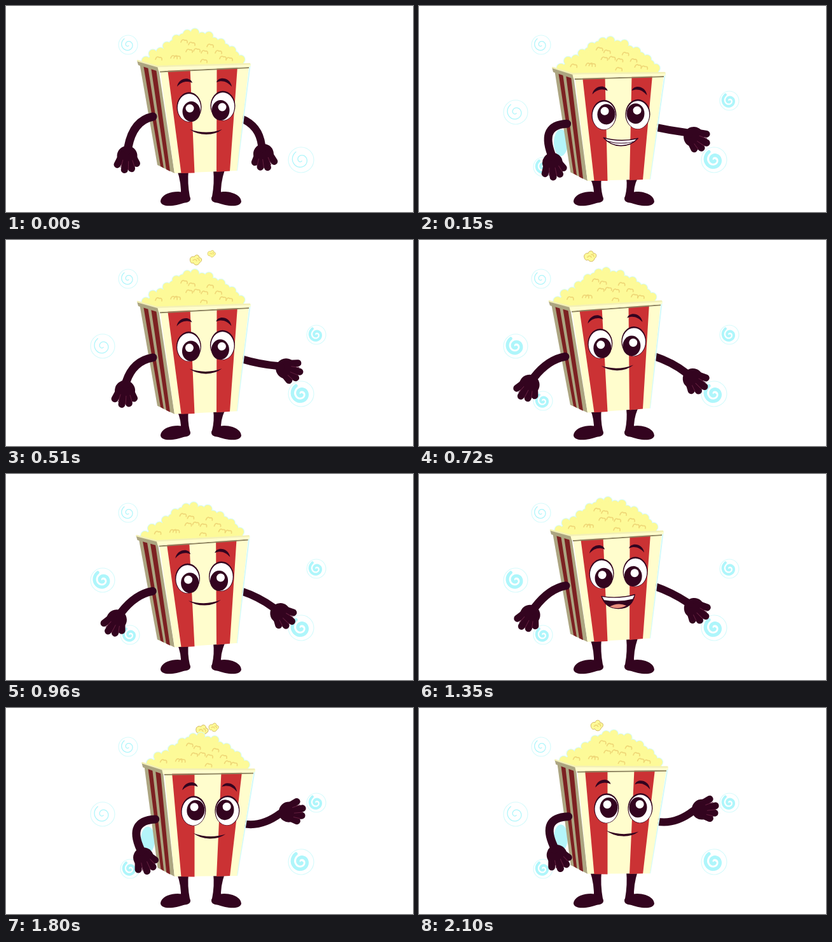
An HTML page for the animation above (2.13 s loop, 640 px wide and 324 px high).

```html
<!DOCTYPE html>
<html lang="en">
<head>
<meta charset="utf-8">
<title>Dancing popcorn</title>
<style>
html, body { margin: 0; width: 100%; height: 100%; overflow: hidden; background: #fff; }
svg { display: block; width: 640px; height: 324px; }
.ink { fill: #33041f; }
.line { fill: none; stroke: #33041f; stroke-linecap: round; stroke-linejoin: round; }
.cream { fill: #fffdcd; }
.red { fill: #cb3234; }
.shade { fill: #aca581; }
.wine { fill: #7c2122; }
.halo { fill: none; stroke: #d3fafa; stroke-width: 2; stroke-linejoin: round; }
.corn { fill: #fdfa98; }
.crumb { fill: none; stroke: #efd777; stroke-width: 1.7; stroke-linecap: round; }
.swirl { fill: none; stroke: #aef6fb; stroke-linecap: round; }
.ring { fill: none; stroke: #d6fbfc; stroke-width: 1.2; }
.seam { fill: none; stroke: #64203f; stroke-width: 1; stroke-linecap: round; }
</style>
</head>
<body>
<svg viewBox="0 0 640 324">
  <defs>
    <path id="foot" class="ink" d="M243 308C243 298 257 292 270 292C278 292 290 296 290 303C290 308 285 309 279 310C268 314 246 318 243 308Z"/>
    <g id="hand">
      <ellipse class="ink" cx="14" cy="0" rx="16" ry="16"/>
      <path class="line" stroke-width="11" d="M12 8L24 16M16 5L33 9M16 -1L36 -2M13 -8L29 -14"/>
      <path class="seam" d="M20 9L29 13M22 3L35 4M21 -6L33 -8"/>
    </g>
    <g id="kernel">
      <path class="corn" stroke="#c9a94e" stroke-width=".8" d="M-9 2C-11 -4 -5 -6 -3 -5C-2 -10 5 -10 5 -5C11 -6 11 1 7 3C6 9 -1 9 -3 5C-6 7 -8 5 -9 2Z"/>
      <path class="crumb" d="M-4 1Q-1 -3 2 1M2 -3Q5 -4 6 0"/>
    </g>
  </defs>
  <g id="swirls"></g>
  <ellipse id="glow" cx="223" cy="205" rx="11" ry="21" fill="#b4f5fa"/>
  <g id="kernels"></g>
  <path id="legL" class="ink"/>
  <path id="legR" class="ink" transform="matrix(-1 0 0 1 613 0)"/>
  <use href="#foot"/>
  <use href="#foot" transform="matrix(-1 0 0 1 613 0)"/>
  <path id="armR" class="line" stroke-width="12"/>
  <use id="handR" href="#hand"/>
  <g id="tub">
    <path class="halo" d="M363 259L384 91"/>
    <g id="heap"></g>
    <path class="shade" d="M210 90L240 99L265 263L238 250Z"/>
    <path class="wine" d="M216 93L223 95L248 255L243 252ZM228 97L236 99L258 260L252 257Z"/>
    <path class="cream" d="M242 99L382 94L363 259L265 263Z"/>
    <path class="red" d="M254 99L289.500 98L296.500 262.500L275.500 263ZM331.500 97L364 95L352 259.500L331 261Z"/>
    <path fill="none" stroke="#8c825f" stroke-width="2" d="M242 103.500L382 97"/>
    <path class="shade" d="M206 86L239 95L240 103L208 93Z"/>
    <path class="cream" d="M238 95L384 90Q386 94 383 96L240 102.500Z"/>
    <path fill="none" stroke="#f3f0b6" stroke-width="2.500" stroke-linejoin="round" stroke-linecap="round" d="M207 86L238 95L383 91"/>
    <g id="face">
      <path class="ink" d="M269 127C271 113 290 110 293 121C284 117 276 119 269 127ZM355 127C353 112 334 110 331 120C340 116 348 119 355 127Z"/>
      <ellipse class="ink" cx="288" cy="159" rx="19.500" ry="23.500"/>
      <ellipse class="ink" cx="341" cy="157" rx="19.500" ry="23.500"/>
      <ellipse fill="#fff" cx="288" cy="160" rx="18.200" ry="22"/>
      <ellipse fill="#fff" cx="341" cy="158" rx="18.200" ry="22"/>
      <g id="pupilL"><ellipse class="ink" rx="14" ry="16"/><circle fill="#fff" cx="-2.500" cy="-5" r="6.500"/></g>
      <g id="pupilR"><ellipse class="ink" rx="14" ry="16"/><circle fill="#fff" cx="2.500" cy="-5" r="6.500"/></g>
      <path id="smile" class="ink" d="M289 194Q315 203 340 194Q330 202 315 202Q300 202 289 194Z"/>
      <g id="grin">
        <path fill="#fff" stroke="#33041f" stroke-width="1.500" stroke-linejoin="round" d="M288 195Q315 202 342 195Q331 207 315 207Q299 207 288 195Z"/>
        <path class="line" stroke-width="1" d="M294 200Q315 206 336 200"/>
      </g>
      <g id="laugh">
        <path class="ink" d="M287 194Q315 199 341 192Q337 216 314 215Q293 214 287 194Z"/>
        <path fill="#fff" d="M289 195.500Q315 200 339.500 194L337 199.500Q315 205 292 200.500Z"/>
        <path fill="#e98f7d" d="M301 211Q314 204 327 210Q314 217 301 211Z"/>
      </g>
    </g>
  </g>
  <path id="armL" class="line" stroke-width="13"/>
  <use id="handL" href="#hand"/>
</svg>
<script>
const LOOP = 2130, STEP = 30, BEAT = LOOP / 6;
const $ = id => document.getElementById(id);
const set = (el, attrs) => { for (const k in attrs) el.setAttribute(k, attrs[k]); return el; };
const add = (parent, tag, attrs) =>
  parent.appendChild(set(document.createElementNS("http://www.w3.org/2000/svg", tag), attrs));
const show = (el, on) => { el.style.display = on ? "" : "none"; };

// body: lean, tilt, drop, face lift, gaze (0 down, 1 up)
// left, right: elbow x y, wrist x y, hand angle
const poses = [
  { at: 0,    body: [0, 0, 0, 0, 0],         left: [200, 180, 192, 222, 96],  right: [398, 188, 402, 219, 78] },
  { at: 150,  body: [3, 1.5, 12.5, 0, 1],    left: [191, 187, 208, 233, 82],  right: [396, 196, 420, 199, 30] },
  { at: 510,  body: [0, -.5, 10.5, -2, 0],   left: [200, 190, 189, 223, 98],  right: [400, 196, 427, 198, 18] },
  { at: 720,  body: [-2, -2.5, 7.5, -4, 0],  left: [203, 188, 181, 216, 122], right: [398, 192, 420, 209, 40] },
  { at: 1350, body: [0, -1.5, .5, -3, 0],    left: [205, 180, 182, 210, 122], right: [398, 186, 422, 202, 40] },
  { at: 1620, body: [7, 2.5, 11, 0, 1],      left: [191, 186, 211, 230, 70],  right: [402, 195, 431, 174, -10] },
  { at: 2100, body: [7, 3, -1, 0, 1],        left: [191, 172, 212, 218, 70],  right: [402, 184, 431, 162, -10] }
];

// swirl centre and radius; looks has one digit per pose: 0 hidden, 1 thin, 2 bold
const swirls = [
  { x: 192, y: 61,  r: 15, looks: "1111111" },
  { x: 152, y: 167, r: 19, looks: "0112211" },
  { x: 195, y: 253, r: 15, looks: "0202222" },
  { x: 488, y: 149, r: 15, looks: "0222222" },
  { x: 464, y: 242, r: 20, looks: "1222222" }
];

// tossed kernels: x and y at the peak, time of the peak, drift, size
const tosses = [
  { x: 297, y: 23, at: 450,  drift: .02,  size: .95 },
  { x: 321, y: 10, at: 440,  drift: .03,  size: .65 },
  { x: 269, y: 26, at: 720,  drift: -.03, size: 1 },
  { x: 307, y: 11, at: 1700, drift: .01,  size: 1 },
  { x: 327, y: 22, at: 1740, drift: -.01, size: .8 },
  { x: 280, y: 27, at: 2080, drift: -.02, size: 1 }
];

function spiral(r) {
  let d = "";
  for (let i = 0; i <= 40; i++) {
    const a = i / 40 * Math.PI * 3 + 1, q = r * (.1 + .65 * i / 40);
    d += (i ? "L" : "M") + (q * Math.cos(a)).toFixed(1) + " " + (q * Math.sin(a)).toFixed(1);
  }
  return d;
}

for (const s of swirls) {
  s.el = add($("swirls"), "g", { transform: `translate(${s.x} ${s.y})` });
  add(s.el, "circle", { class: "ring", r: s.r });
  s.curl = add(s.el, "path", { class: "swirl", d: spiral(s.r) });
}
for (const k of tosses) k.el = add($("kernels"), "use", { href: "#kernel" });

function buildHeap() {
  const heap = $("heap");
  const edge = [[220, 86], [231, 75], [243, 72], [253, 63], [263, 60], [268, 52], [278, 50], [285, 44],
    [297, 42], [308, 48], [319, 47], [327, 56], [338, 58], [345, 66], [355, 70], [360, 78], [369, 84]];
  for (const cls of ["halo", "corn"]) {
    for (const [x, y] of edge) add(heap, "circle", { class: cls, cx: x, cy: y, r: 6.5 });
    add(heap, "path", { class: cls, d: "M212 90L" + edge.join("L") + "L374 91L370 94L238 97Z" });
  }
  const marks = [[280, 55], [292, 59], [288, 70], [300, 69], [312, 72], [264, 80], [240, 82], [311, 86],
    [334, 72], [341, 81], [351, 83], [269, 80], [321, 62]];
  for (const [x, y] of marks)
    add(heap, "path", { class: "crumb", d: `M${x - 5} ${y + 2}q2 -6 6 -3q5 -1 4 4` });
}
buildHeap();

// the whole figure dips once per beat
const bounce = t => 6 * (1 - Math.cos(2 * Math.PI * t / BEAT + .5));

function poseAt(t) {
  const last = poses.length - 1;
  let i = last;
  while (poses[i].at > t) i--;
  const a = poses[i], b = poses[Math.min(i + 1, last)];
  const u = a === b ? 0 : (t - a.at) / (b.at - a.at);
  const e = (1 - Math.cos(Math.PI * u)) / 2;
  const lerp = (v, w) => v + (w - v) * e;
  const mix = key => a[key].map((v, n) => lerp(v, b[key][n]));
  return { body: mix("body"), left: mix("left"), right: mix("right"),
    bob: bounce(t) - lerp(bounce(a.at), bounce(b.at)), look: u < .5 ? i : Math.min(i + 1, last) };
}

function drawArm(side, from, [ex, ey, wx, wy, angle], bob) {
  const y = wy + bob;
  set($("arm" + side), { d: `M${from}Q${ex} ${ey + bob} ${wx} ${y}` });
  set($("hand" + side), { transform: `translate(${wx} ${y}) rotate(${angle}) scale(1 ${side === "L" ? -1 : 1})` });
}

function draw(t) {
  const p = poseAt(t);
  const [lean, tilt, fall, lift, gaze] = p.body;
  const drop = fall + p.bob, b = tilt / 88, c = -lean / 165;
  const e = -c * 262, f = drop - 300 * b;
  const place = (x, y) => [x + c * y + e, b * x + y + f];

  set($("tub"), { transform: `matrix(1 ${b} ${c} 1 ${e} ${f})` });
  set($("face"), { transform: `translate(${lean * .35 + lift * .3} ${lift})` });
  set($("pupilL"), { transform: `translate(291.5 ${166 - 8 * gaze})` });
  set($("pupilR"), { transform: `translate(337.5 ${164 - 8 * gaze})` });

  const grin = t >= 75 && t < 330, laugh = t >= 1035 && t < 1500;
  show($("grin"), grin);
  show($("laugh"), laugh);
  show($("smile"), !grin && !laugh);

  const hip = 258 + drop, knee = (hip + 298) / 2;
  const leg = `M269 ${hip}L287 ${hip}Q285 ${knee} 289 300L275 300Q276 ${knee} 269 ${hip}Z`;
  set($("legL"), { d: leg });
  set($("legR"), { d: leg });

  drawArm("L", place(231, 174), p.left, p.bob);
  drawArm("R", place(370, 177), p.right, p.bob);

  show($("glow"), p.left[2] > 203);
  set($("glow"), { transform: `translate(0 ${drop * .8})` });

  for (const s of swirls) {
    const look = +s.looks[p.look];
    show(s.el, look);
    set(s.curl, { "stroke-width": look > 1 ? s.r * .27 : 1.3 });
  }
  for (const k of tosses) {
    const dt = t - k.at, y = k.y + .0024 * dt * dt;
    show(k.el, y < 85);
    set(k.el, { transform: `translate(${k.x + k.drift * dt} ${y}) rotate(${dt * .15}) scale(${k.size})` });
  }
}

const start = performance.now();
function tick(now) {
  const t = Math.max(0, now - start) % LOOP;
  draw(Math.floor(t / STEP) * STEP);
  requestAnimationFrame(tick);
}
draw(0);
requestAnimationFrame(tick);
</script>
</body>
</html>
```
